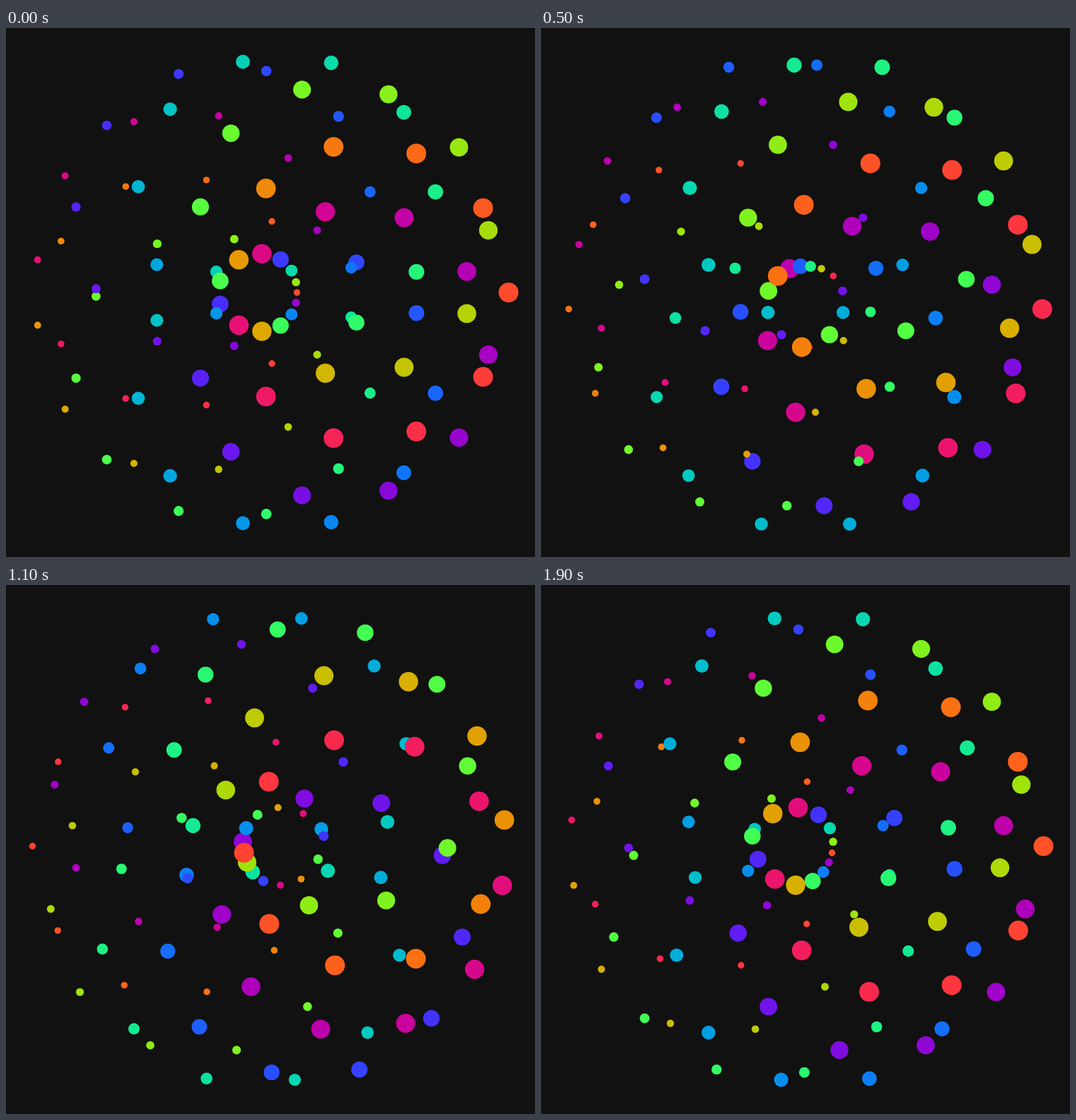
Recreate the animation shown at these times as an HTML page with a canvas. Size 748x748 px, loop 2000 ms.

```html
<!DOCTYPE html>
<html lang="en">
<head>
<meta charset="utf-8">
<title>Orbiting dots</title>
<style>
  html, body { margin: 0; height: 100%; overflow: hidden; background: #111; }
  canvas { display: block; }
</style>
</head>
<body>
<canvas id="stage" width="748" height="748"></canvas>
<script>
const SIZE = 748, DOTS = 100, ARMS = 10;
const LOOP = 2000, STEP = 100;
const TAU = 2 * Math.PI;
const ctx = document.getElementById('stage').getContext('2d');

// Three squared cosines, one radian apart, give the rainbow.
function rainbow(angle) {
  const channel = shift => Math.round(255 * Math.cos(angle + shift) ** 2);
  return `rgb(${channel(0)}, ${channel(1)}, ${channel(2)})`;
}

function draw(progress) {
  ctx.fillStyle = '#111';
  ctx.fillRect(0, 0, SIZE, SIZE);
  for (let i = 0; i < DOTS; i++) {
    // Each dot circles a fixed anchor; one loop carries it to the next arm's place.
    const anchor = TAU * i / ARMS;
    const orbit = TAU * (i / DOTS + progress / ARMS);
    const x = SIZE * (0.5 + Math.cos(anchor) / 4 + Math.cos(orbit) / 5);
    const y = SIZE * (0.5 + Math.sin(anchor) / 4 + Math.sin(orbit) / 5);
    const radius = SIZE / 80 * (1 + Math.cos(orbit) / 2);
    ctx.fillStyle = rainbow(orbit);
    ctx.beginPath();
    ctx.arc(x, y, radius, 0, TAU);
    ctx.fill();
  }
}

function tick() {
  // The motion advances in held steps; the small lead absorbs display latency.
  const step = Math.floor(performance.now() / STEP + 0.2);
  draw(step * STEP % LOOP / LOOP);
  requestAnimationFrame(tick);
}
tick();
</script>
</body>
</html>
```
